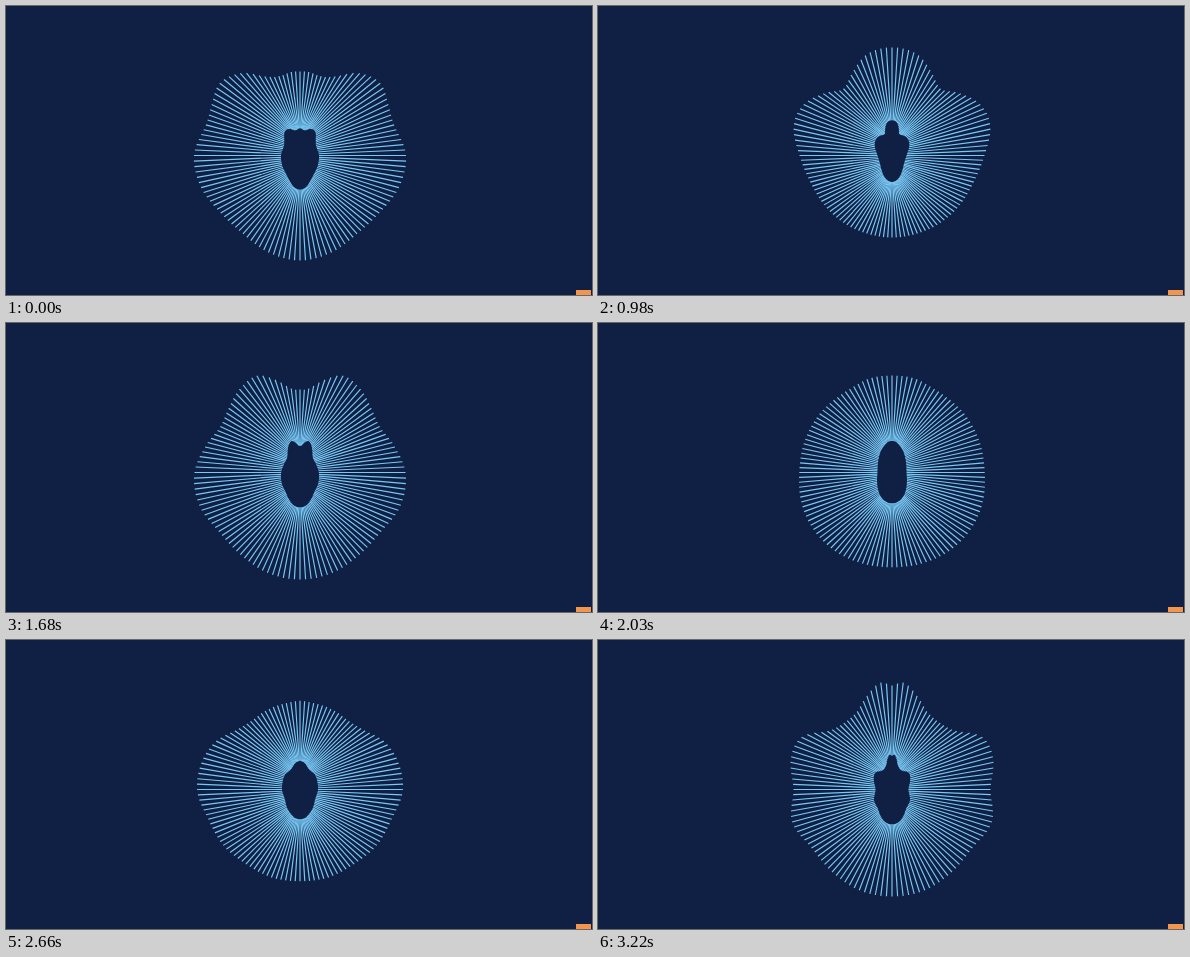
An HTML page without scripts that plays this animation: 586x289 px, repeating every 3290 ms.

```html
<!DOCTYPE html>
<html lang="en">
<head>
<meta charset="utf-8">
<title>Radial pulse</title>
<style>
/* --k0 … --k13: how far the rays reach out, from top to bottom */
@property --k0 { syntax: "<number>"; inherits: true; initial-value: 0 }
@property --k1 { syntax: "<number>"; inherits: true; initial-value: 0 }
@property --k2 { syntax: "<number>"; inherits: true; initial-value: 0 }
@property --k3 { syntax: "<number>"; inherits: true; initial-value: 0 }
@property --k4 { syntax: "<number>"; inherits: true; initial-value: 0 }
@property --k5 { syntax: "<number>"; inherits: true; initial-value: 0 }
@property --k6 { syntax: "<number>"; inherits: true; initial-value: 0 }
@property --k7 { syntax: "<number>"; inherits: true; initial-value: 0 }
@property --k8 { syntax: "<number>"; inherits: true; initial-value: 0 }
@property --k9 { syntax: "<number>"; inherits: true; initial-value: 0 }
@property --k10 { syntax: "<number>"; inherits: true; initial-value: 0 }
@property --k11 { syntax: "<number>"; inherits: true; initial-value: 0 }
@property --k12 { syntax: "<number>"; inherits: true; initial-value: 0 }
@property --k13 { syntax: "<number>"; inherits: true; initial-value: 0 }
@property --d { syntax: "<number>"; inherits: true; initial-value: 0 }
@property --u { syntax: "<number>"; inherits: true; initial-value: 0 }
@property --sin { syntax: "<number>"; inherits: true; initial-value: 0 }
@property --cos { syntax: "<number>"; inherits: true; initial-value: 1 }
@property --w { syntax: "<number>"; inherits: true; initial-value: 11 }

html, body { margin: 0; width: 100%; height: 100%; overflow: hidden; background: #102044 }
svg { display: block; width: 586px; height: 289px; animation: 3290ms infinite; animation-name: crown, sides, rest }

line {
  --u: calc((var(--i) - var(--s)) / var(--n));
  /* smooth curve through four neighbouring controls */
  --d: clamp(0, var(--b) + var(--u) / 2 * (var(--c) - var(--a)
    + var(--u) * (2 * var(--a) - 5 * var(--b) + 4 * var(--c) - var(--e)
    + var(--u) * (3 * (var(--b) - var(--c)) + var(--e) - var(--a)))), 26);
  --sin: sin(var(--i) * 3deg);
  --cos: cos(var(--i) * 3deg);
  /* the hollow is a slightly squared ellipse, the rim a circle */
  --w: calc(11 + 2.2 * var(--cos) * var(--cos));
  --x: (var(--w) + var(--d) / 3) * var(--sin);
  --y: (26.5 + var(--d) / 3) * var(--cos) * -1;
  --dx: (82 - var(--w) + var(--d) * 2 / 3) * var(--sin);
  --dy: (55.5 + var(--d) * 2 / 3) * var(--cos) * -1;
  transform: matrix(calc(var(--dx)), calc(var(--dy)), calc(-1 * (var(--dy))), calc(var(--dx)), calc(var(--x)), calc(var(--y)));
  stroke: #78c8f5;
  stroke-width: 1.15px;
  vector-effect: non-scaling-stroke;
}

@keyframes crown {
  0% { --k0: 2; --k1: 2; --k2: 0; animation-timing-function: steps(3) }
  6.383% { --k0: 26; --k1: 18; --k2: 9; animation-timing-function: steps(4) }
  14.894% { --k0: 1; --k1: 11; --k2: 25; animation-timing-function: steps(7) }
  29.787% { --k0: 26; --k1: 25.5; --k2: 21.5; animation-timing-function: steps(4) }
  38.298% { --k0: 26; --k1: 24; --k2: 17; animation-timing-function: steps(6) }
  51.064% { --k0: 1; --k1: 2.5; --k2: 14; animation-timing-function: steps(9) }
  70.213% { --k0: 26; --k1: 25; --k2: 15; animation-timing-function: steps(6) }
  82.979% { --k0: 3; --k1: 2; --k2: 3; animation-timing-function: steps(3) }
  89.362% { --k0: 14; --k1: 2.5; --k2: 1; animation-timing-function: steps(2) }
  93.617% { --k0: 25; --k1: 16; --k2: 9; animation-timing-function: steps(2) }
  97.872%, 100% { --k0: 22; --k1: 25.5; --k2: 15 }
}
@keyframes sides {
  0% { --k7: 17; --k8: 24; animation-timing-function: steps(7) }
  14.894% { --k7: 6; --k8: .5; animation-timing-function: steps(4) }
  23.404% { --k7: 25; --k8: 8; animation-timing-function: steps(3) }
  29.787% { --k7: 21; --k8: 10.5; animation-timing-function: steps(5) }
  40.426% { --k7: 18; --k8: 25; animation-timing-function: steps(5) }
  51.064% { --k7: 15; --k8: 23.5; animation-timing-function: steps(9) }
  70.213% { --k7: 7.5; --k8: .5; animation-timing-function: steps(6) }
  82.979% { --k7: 22; --k8: 25; animation-timing-function: steps(3) }
  89.362% { --k7: 25; --k8: 25; animation-timing-function: steps(4) }
  97.872%, 100% { --k7: 24; --k8: 16.5 }
}
@keyframes rest {
  0% { --k3: 4.5; --k4: 19.5; --k5: 26; --k6: 20; --k9: 22; --k10: 16; --k11: 15; --k12: 20; --k13: 23; animation-timing-function: steps(7) }
  14.894% { --k3: 21.5; --k4: 16; --k5: 18.5; --k6: 22; --k9: 4.5; --k10: 15; --k11: 18; --k12: 16; --k13: 14; animation-timing-function: steps(7) }
  29.787% { --k3: 11.5; --k4: .5; --k5: 10.5; --k6: 20; --k9: 4; --k10: 2; --k11: 1; --k12: 0; --k13: 0; animation-timing-function: steps(10) }
  51.064% { --k3: 24; --k4: 21; --k5: 14; --k6: 10; --k9: 24; --k10: 18.5; --k11: 19.5; --k12: 23.5; --k13: 25; animation-timing-function: steps(9) }
  70.213% { --k3: 2.5; --k4: 3; --k5: 9; --k6: 12; --k9: 5; --k10: 12.5; --k11: 11.5; --k12: 6; --k13: 3; animation-timing-function: steps(9) }
  89.362% { --k3: 5; --k4: 1.5; --k5: 3; --k6: 17; --k9: 22; --k10: 13.5; --k11: 9; --k12: 14; --k13: 15; animation-timing-function: steps(4) }
  97.872%, 100% { --k3: 3.5; --k4: 0; --k5: 5; --k6: 22.5; --k9: 23; --k10: 17.5; --k11: 20; --k12: 24; --k13: 25 }
}
</style>
</head>
<body>
<svg viewBox="0 0 586 289">
  <rect width="586" height="289" fill="#102044"/>
  <g transform="translate(294 149.5)">
    <line x2="1" style="--i:0;--d:var(--k0)"/>
    <g id="half">
      <g style="--s:0;--n:2;--a:var(--k1);--b:var(--k0);--c:var(--k1);--e:var(--k2)">
        <line x2="1" style="--i:1"/>
      </g>
      <g style="--s:2;--n:3;--a:var(--k0);--b:var(--k1);--c:var(--k2);--e:var(--k3)">
        <line x2="1" style="--i:2"/><line x2="1" style="--i:3"/><line x2="1" style="--i:4"/>
      </g>
      <g style="--s:5;--n:3;--a:var(--k1);--b:var(--k2);--c:var(--k3);--e:var(--k4)">
        <line x2="1" style="--i:5"/><line x2="1" style="--i:6"/><line x2="1" style="--i:7"/>
      </g>
      <g style="--s:8;--n:4;--a:var(--k2);--b:var(--k3);--c:var(--k4);--e:var(--k5)">
        <line x2="1" style="--i:8"/><line x2="1" style="--i:9"/><line x2="1" style="--i:10"/><line x2="1" style="--i:11"/>
      </g>
      <g style="--s:12;--n:4;--a:var(--k3);--b:var(--k4);--c:var(--k5);--e:var(--k6)">
        <line x2="1" style="--i:12"/><line x2="1" style="--i:13"/><line x2="1" style="--i:14"/><line x2="1" style="--i:15"/>
      </g>
      <g style="--s:16;--n:4;--a:var(--k4);--b:var(--k5);--c:var(--k6);--e:var(--k7)">
        <line x2="1" style="--i:16"/><line x2="1" style="--i:17"/><line x2="1" style="--i:18"/><line x2="1" style="--i:19"/>
      </g>
      <g style="--s:20;--n:4;--a:var(--k5);--b:var(--k6);--c:var(--k7);--e:var(--k8)">
        <line x2="1" style="--i:20"/><line x2="1" style="--i:21"/><line x2="1" style="--i:22"/><line x2="1" style="--i:23"/>
      </g>
      <g style="--s:24;--n:6;--a:var(--k6);--b:var(--k7);--c:var(--k8);--e:var(--k9)">
        <line x2="1" style="--i:24"/><line x2="1" style="--i:25"/><line x2="1" style="--i:26"/><line x2="1" style="--i:27"/><line x2="1" style="--i:28"/><line x2="1" style="--i:29"/>
      </g>
      <g style="--s:30;--n:6;--a:var(--k7);--b:var(--k8);--c:var(--k9);--e:var(--k10)">
        <line x2="1" style="--i:30"/><line x2="1" style="--i:31"/><line x2="1" style="--i:32"/><line x2="1" style="--i:33"/><line x2="1" style="--i:34"/><line x2="1" style="--i:35"/>
      </g>
      <g style="--s:36;--n:6;--a:var(--k8);--b:var(--k9);--c:var(--k10);--e:var(--k11)">
        <line x2="1" style="--i:36"/><line x2="1" style="--i:37"/><line x2="1" style="--i:38"/><line x2="1" style="--i:39"/><line x2="1" style="--i:40"/><line x2="1" style="--i:41"/>
      </g>
      <g style="--s:42;--n:6;--a:var(--k9);--b:var(--k10);--c:var(--k11);--e:var(--k12)">
        <line x2="1" style="--i:42"/><line x2="1" style="--i:43"/><line x2="1" style="--i:44"/><line x2="1" style="--i:45"/><line x2="1" style="--i:46"/><line x2="1" style="--i:47"/>
      </g>
      <g style="--s:48;--n:6;--a:var(--k10);--b:var(--k11);--c:var(--k12);--e:var(--k13)">
        <line x2="1" style="--i:48"/><line x2="1" style="--i:49"/><line x2="1" style="--i:50"/><line x2="1" style="--i:51"/><line x2="1" style="--i:52"/><line x2="1" style="--i:53"/>
      </g>
      <g style="--s:54;--n:6;--a:var(--k11);--b:var(--k12);--c:var(--k13);--e:var(--k12)">
        <line x2="1" style="--i:54"/><line x2="1" style="--i:55"/><line x2="1" style="--i:56"/><line x2="1" style="--i:57"/><line x2="1" style="--i:58"/><line x2="1" style="--i:59"/>
      </g>
    </g>
    <use href="#half" transform="scale(-1 1)"/>
    <line x2="1" style="--i:60;--d:var(--k13)"/>
  </g>
  <rect x="570" y="284" width="15" height="5" fill="#f2954f"/>
</svg>
</body>
</html>
```
